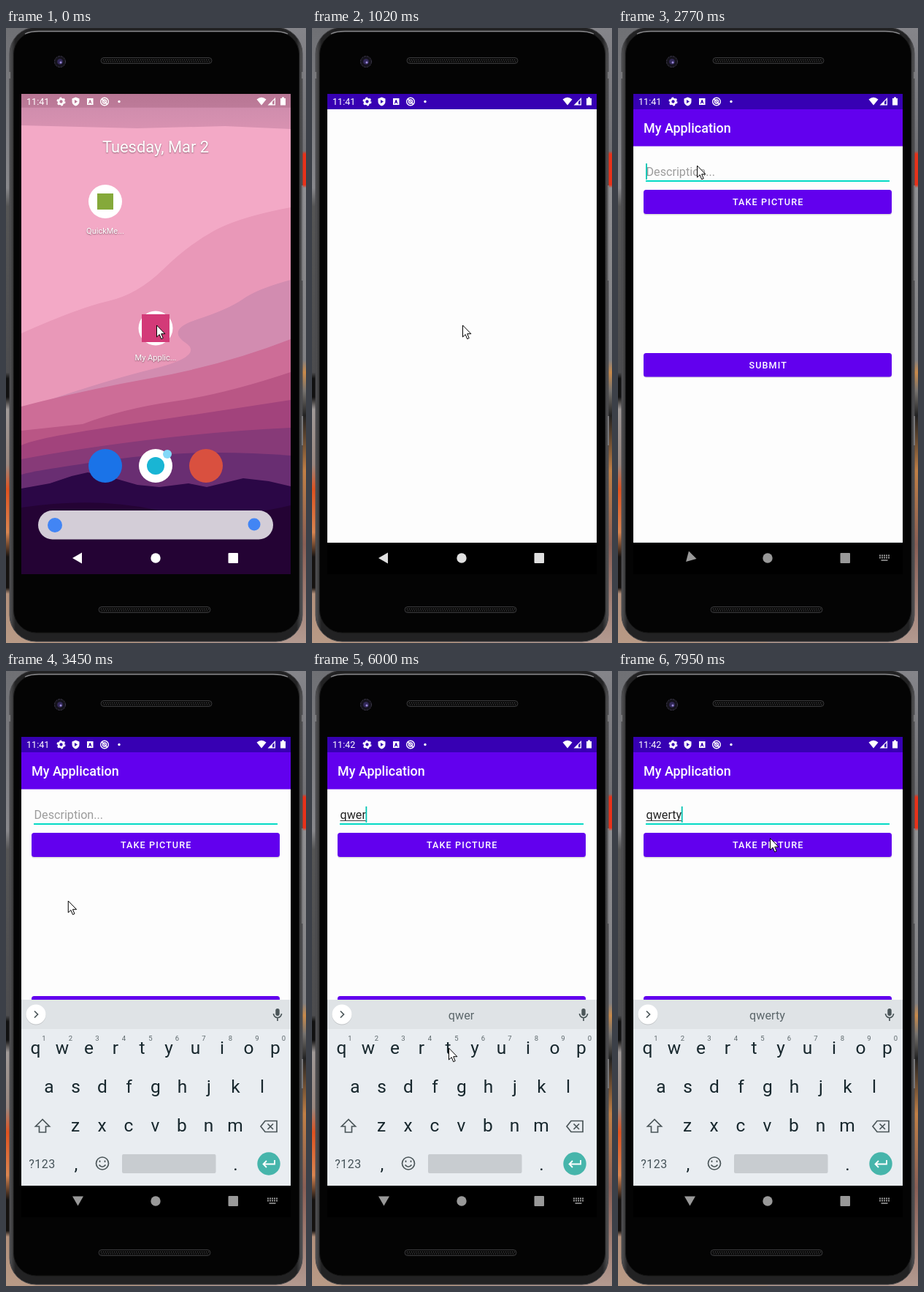
These frames come from a looping animation (411x840 px, 8 s). An HTML page:

```html
<!DOCTYPE html>
<html lang="en">
<head>
<meta charset="utf-8">
<title>Phone demo</title>
<style>
html, body { margin: 0; height: 100%; overflow: hidden; background: #000 }
svg { display: block; width: 100vw; height: 100vh }
text { font-family: Roboto, "Noto Sans", sans-serif; white-space: pre }
.mid { text-anchor: middle }
.label { font-size: 11px; fill: #fff; text-shadow: 0 1px 2px #0007 }
.btn { font-size: 12.6px; font-weight: 500; letter-spacing: 1.12px; fill: #fff }
.line { fill: none; stroke: #4b5659; stroke-width: 1.7 }
</style>
</head>
<body>
<svg viewBox="0 0 411 840">
<defs>
  <linearGradient id="left" x2="0" y2="1">
    <stop offset="0" stop-color="#6f7074"/><stop offset=".26" stop-color="#88888c"/>
    <stop offset=".29" stop-color="#555"/><stop offset=".56" stop-color="#4c4c4e"/>
    <stop offset=".57" stop-color="#111"/><stop offset=".6" stop-color="#111"/>
    <stop offset=".62" stop-color="#a09a98"/><stop offset=".71" stop-color="#9a8880"/>
    <stop offset=".75" stop-color="#e0521f"/><stop offset=".82" stop-color="#d98550"/>
    <stop offset=".86" stop-color="#151210"/><stop offset=".91" stop-color="#151210"/>
    <stop offset=".92" stop-color="#b3917c"/><stop offset="1" stop-color="#b89a86"/>
  </linearGradient>
  <linearGradient id="right" x2="0" y2="1">
    <stop offset="0" stop-color="#85858a"/><stop offset=".2" stop-color="#707074"/>
    <stop offset=".205" stop-color="#e8321a"/><stop offset=".255" stop-color="#e8321a"/>
    <stop offset=".26" stop-color="#8f8f92"/><stop offset=".54" stop-color="#808083"/>
    <stop offset=".56" stop-color="#c98a4a"/><stop offset=".59" stop-color="#77736f"/>
    <stop offset=".63" stop-color="#222"/><stop offset=".72" stop-color="#c07f45"/>
    <stop offset=".84" stop-color="#8a5f55"/><stop offset="1" stop-color="#b39a90"/>
  </linearGradient>
  <linearGradient id="edge" x2="1" y2="0">
    <stop offset="0" stop-color="#555557"/><stop offset=".02" stop-color="#222223"/>
    <stop offset=".98" stop-color="#222223"/><stop offset="1" stop-color="#555557"/>
  </linearGradient>
  <linearGradient id="shade" x2="0" y2="1">
    <stop offset="0" stop-color="#b87694"/><stop offset=".38" stop-color="#bd7b99"/>
    <stop offset=".4" stop-color="#d08dad"/><stop offset="1" stop-color="#d892b1"/>
  </linearGradient>
  <clipPath id="screen"><path d="M21 90h369v656h-369z"/></clipPath>
  <clipPath id="body"><path d="M21 111h369v592h-369z"/></clipPath>
  <clipPath id="button"><rect x="35" y="221" width="340" height="33" rx="3.5"/></clipPath>
</defs>

<!-- surroundings and phone -->
<path d="M0 0h205v840h-205z" fill="url(#left)"/>
<path d="M205 0h206v840h-206z" fill="url(#right)"/>
<rect x="5" y="-1" width="401" height="839" rx="36" fill="url(#edge)" stroke="#47474a"/>
<rect x="10.500" y="5" width="391" height="821" rx="31" fill="#040404" stroke="#151515"/>
<path d="M26 8Q33 4.500 45 4.500H366Q378 4.500 386 8" fill="none" stroke="#8b8b8e" stroke-width="1.300"/>
<path d="M5 60v9M406 60v9M406 215v130M406 530v40" stroke="#77777a" stroke-width="2"/>
<g fill="#0d0d0d" stroke="#38383a">
  <rect x="130" y="40.500" width="152" height="8" rx="4"/>
  <rect x="127" y="790.500" width="153" height="8" rx="4"/>
</g>
<path d="M133 43.500h147M134 46h145M130 793.500h148M131 796h146" stroke="#4a4a4c" stroke-dasharray="1 2"/>
<circle cx="74" cy="46" r="7.500" fill="#15131c" stroke="#3c3848" stroke-dasharray="3 1"/>
<circle cx="74" cy="46" r="3.800" fill="#33295a"/>
<circle cx="75" cy="47" r="1.500" fill="#9b8cd8"/>

<g clip-path="url(#screen)">
  <g id="home">
    <path d="M21 90h369v656h-369z" fill="#f3a9c6"/>
    <path d="M21 90H390V138L300 134 180 137 21 133z" fill="url(#shade)"/>
    <path d="M390 245Q320 258 285 277T215 330 140 373 21 417V746H390z" fill="#e998b8"/>
    <path d="M390 344Q345 356 325 370T262 398 246 430 200 466 21 521V746H390z" fill="#d28cb0"/>
    <path d="M390 425Q300 460 200 478T21 517V746H390z" fill="#cd6d97"/>
    <path d="M390 470Q300 500 230 510T105 541L21 550V746H390z" fill="#b95685"/>
    <path d="M390 508Q260 528 150 544T21 570V746H390z" fill="#a2437c"/>
    <path d="M390 546Q300 550 200 562T21 589V746H390z" fill="#873a78"/>
    <path d="M390 584Q260 574 150 589T21 610V746H390z" fill="#692e72"/>
    <path d="M21 629L60 622 90 612 112 607 145 614 180 624 210 627 250 622 275 627 325 615 360 619 390 626V746H21z" fill="#2b0746"/>
    <path d="M21 655Q120 640 205 658T390 652V746H21z" fill="#240334"/>
    <text class="mid" x="205" y="170" font-size="21.900" fill="#fff" style="text-shadow:0 1px 2px #0006">Tuesday, Mar 2</text>
    <circle cx="136" cy="237" r="23" fill="#fff"/>
    <path d="M125 226h22v22h-22z" fill="#85a93a"/>
    <text class="label mid" x="136" y="281">QuickMe...</text>
    <circle cx="205" cy="410" r="23.500" fill="#fff"/>
    <path d="M186 391h38v38h-38z" fill="#d33a78"/>
    <text class="label mid" x="205" y="454">My Applic...</text>
    <circle cx="136" cy="598" r="23" fill="#1a73e8"/>
    <circle cx="205" cy="598" r="23" fill="#fff"/>
    <circle cx="205" cy="598" r="12" fill="#19b5d4"/>
    <circle cx="221" cy="582" r="6" fill="#83d8f7"/>
    <circle cx="274" cy="598" r="23" fill="#d9503f"/>
    <rect x="44" y="659" width="322" height="39.500" rx="19.700" fill="#d3cdd7"/>
    <circle cx="67" cy="679" r="10" fill="#4285f4"/>
    <circle cx="340" cy="678" r="8.500" fill="#4285f4"/>
  </g>
  <rect id="launch" fill="#fdfdfd"/>

  <g id="app">
    <path d="M21 90h369v656h-369z"/>
    <path d="M21 90h369v21h-369z" fill="#3700b3"/>
    <path d="M21 111h369v592h-369z" fill="#fdfdfd"/>
    <g id="content" clip-path="url(#body)">
      <path d="M21 111h369v50.500h-369z" fill="#6200ee"/>
      <text x="35" y="143" font-size="17.960" font-weight="500" fill="#fff">My Application</text>
      <text id="field" x="38.500" y="202" font-size="16.160"/>
      <path id="under" stroke="#444"/>
      <path d="M38 209h334" stroke="#03dac5" stroke-width="1.800"/>
      <path id="caret" stroke="#03c4b2" stroke-width="1.800"/>
      <rect x="35" y="222.500" width="340" height="33" rx="3.500" fill="#0002"/>
      <rect x="35" y="445.500" width="340" height="32" rx="3.500" fill="#0002"/>
      <rect id="lift" x="35" y="226" width="340" height="33" rx="4" fill="#0003"/>
      <rect x="35" y="221" width="340" height="33" rx="3.500" fill="#6200ee"/>
      <circle id="ripple" cx="209" cy="236" fill="#fff" clip-path="url(#button)"/>
      <rect x="35" y="444" width="340" height="32.500" rx="3.500" fill="#6200ee"/>
      <text class="btn mid" x="205.700" y="242.300">TAKE PICTURE</text>
      <text class="btn mid" x="205.700" y="465">SUBMIT</text>
      <g id="board">
        <path d="M21 449h369v254h-369z" fill="#e9edf1"/>
        <path d="M21 449h369v40h-369z" fill="#dfe3e6"/>
        <circle cx="41" cy="470" r="13.500" fill="#0002"/>
        <circle cx="41" cy="469" r="13.500" fill="#fff"/>
        <path class="line" d="M39 464.500l4.500 4.500-4.500 4.500"/>
        <rect x="369.300" y="461" width="5.400" height="10" rx="2.700" fill="#4b5659"/>
        <path class="line" d="M366.500 468a5.500 5.500 0 0 0 11 0M372 474v4" stroke-width="1.400"/>
        <path id="bars" d="M150.500 458v22M258.500 458v22" stroke="#c3c8cb"/>
        <g id="words" class="mid" font-size="16.200" fill="#5c676b"></g>
        <g id="keys" class="mid" font-size="24.500" fill="#17272d"></g>
        <path class="line" d="M50 612.500l-9.500 9.500h5v8h9v-8h5z"/>
        <path class="line" d="M355 614.500h16v15h-16l-6-7.500zM358.500 618.500l7.500 7.500M366 618.500l-7.500 7.500"/>
        <circle class="line" cx="132" cy="672.500" r="8.500"/>
        <path class="line" d="M127.500 674.500q4.500 5.500 9 0M128.500 668.500v2.500M135.500 668.500v2.500"/>
        <rect x="159" y="660" width="128.500" height="26" rx="2" fill="#c8ccd0"/>
        <text class="mid" x="49.500" y="678.500" font-size="16" letter-spacing=".5" fill="#455258">?123</text>
        <circle cx="360" cy="673" r="15.700" fill="#46b5ab"/>
        <path d="M368 668v5.500h-15M357 669l-4.500 4.500 4.500 4.500" fill="none" stroke="#fff" stroke-width="1.800"/>
      </g>
    </g>
  </g>

  <!-- status bar -->
  <g fill="#fff">
    <text id="clock" x="28" y="105" font-size="12.600"/>
    <circle cx="75.500" cy="100.500" r="3.500" fill="none" stroke="#fff" stroke-width="2.700"/>
    <circle cx="75.500" cy="100.500" r="5.200" fill="none" stroke="#fff" stroke-width="1.700" stroke-dasharray="2.700 2.750"/>
    <path fill-rule="evenodd" d="M95.500 94.500l5 2v4q0 4-5 6-5-2-5-6v-4zM94 98v5l4-2.500z"/>
    <path fill-rule="evenodd" d="M111 96h8.500v9h-8.500zM112.700 103.500h1l.5-1.300h2l.5 1.300h1l-2-5.500h-1z"/>
    <g fill="none" stroke="#fff" stroke-width="1.400">
      <circle cx="135" cy="100.500" r="5.300"/><circle cx="135" cy="100.500" r="2.500"/><path d="M131 96.500l8 8"/>
    </g>
    <circle cx="155" cy="100.500" r="1.700"/>
    <path d="M343.500 97.500q6.500-5.500 13 0l-6.500 8z"/>
    <path fill-rule="evenodd" d="M369 95v10.500h-10.500zM367.700 98v6.200h-2.700v-3.500z"/>
    <path d="M376 96h2v-1.500h3v1.500h2v9.500h-7z"/>
  </g>

  <!-- navigation bar -->
  <g id="nav">
    <path id="back" d="M-8 0L5-7.500V7.500z"/>
    <circle cx="205" cy="724" r="6.700"/>
    <rect x="304.500" y="717" width="13.500" height="14" rx="1"/>
    <g id="switcher">
      <path d="M358 720.500h14M358 723.500h14" stroke="#999" stroke-width="1.800" stroke-dasharray="2 1"/>
      <path d="M360.500 727h9" stroke="#999" stroke-width="1.600"/>
    </g>
  </g>
</g>
<path id="cursor" d="M0 0V16L3.700 12.600 6.200 18.700 8.700 17.600 6.200 11.700H11.400z" fill="#fff" stroke="#000"/>
</svg>

<script>
const LOOP = 8000, STEP = 132.5;
const $ = id => document.getElementById(id);
const set = (id, attrs) => { for (const k in attrs) $(id).setAttribute(k, attrs[k]); };
const show = (id, on) => { $(id).style.display = on ? '' : 'none'; };

// Rows are [time, ...values]; values are interpolated between rows.
function track(t, rows) {
  const i = rows.findIndex(r => r[0] > t);
  if (i < 0) return rows.at(-1).slice(1);
  if (!i) return rows[0].slice(1);
  const a = rows[i - 1], b = rows[i], p = (t - a[0]) / (b[0] - a[0]);
  return a.slice(1).map((v, k) => v + (b[k + 1] - v) * p);
}

const label = (s, x, y, extra = '') => `<text x="${x}" y="${y}" ${extra}>${s}</text>`;
const row = (s, x, y) => [...s].map((c, i) => label(c, x + i * 36.5, y)).join('');
$('keys').innerHTML = row('qwertyuiop', 40.5, 523) + row('asdfghjkl', 59, 576) +
  row('zxcvbnm', 95, 629) + label(',', 96, 682) + label('.', 314.5, 682) +
  [...'1234567890'].map((c, i) => label(c, 52 + i * 36.5, 505, 'font-size="9.5" fill="#5c676b"')).join('');

const PATH = [
  [1590, 206.5, 406], [2120, 108.5, 188], [3180, 108.5, 188], [3710, 62, 440], [4108, 40, 517],
  [4505, 40, 517], [4637, 69, 518], [4770, 77, 517], [4902, 77, 517], [5167, 113, 517],
  [5300, 113, 517], [5565, 150, 516], [5697, 150, 516], [5962, 187.5, 515], [6095, 187.5, 515],
  [6360, 224, 517], [6492, 224, 517], [7020, 208.5, 228.5]
];
const TYPED = [4372, 4902, 5300, 5697, 6095, 6492];
const TAPS = [1325, 2500, ...TYPED];

function draw(t) {
  const [x, y] = track(t, PATH);
  set('cursor', { transform: `translate(${x} ${y})` });

  const [open] = track(t, [[0, 0], [390, 1]]);
  const grow = (from, to) => from + (to - from) * open;
  show('home', open < 1);
  show('app', open === 1);
  set('launch', {
    x: grow(181, 21), y: grow(387, 90), width: grow(47, 369), height: grow(47, 656),
    rx: grow(23, 0), opacity: Math.min(1, open * 1.8)
  });
  set('content', { opacity: track(t, [[927, 0], [1325, 1]])[0] });
  $('clock').textContent = t < 5400 ? '11:41' : '11:42';

  const word = 'qwerty'.slice(0, TYPED.filter(k => k <= t).length);
  const field = $('field');
  field.textContent = word || 'Description...';
  set('field', { fill: word ? '#222' : '#9c9c9c' });
  const end = 39 + (word ? field.getComputedTextLength() : 0);
  set('under', { d: word ? `M38.5 204.5H${end - .5}` : '' });
  set('caret', { d: `M${end} 185V207` });
  const tap = TAPS.findLast(k => k <= t) || 0;
  show('caret', (t - tap) % 1000 < 500);

  const three = word === 'q';
  show('bars', three);
  $('words').innerHTML = three
    ? label('q', 102, 475.5) + label('a', 204, 475.5) + label('l', 306, 475.5)
    : label(word, 204.5, 475.5);
  const [slide] = track(t, [[2782, 254], [2915, 150], [3047, 45], [3180, 0]]);
  set('board', { transform: `translate(0 ${slide})` });

  const press = t > 7250 && t < 7500;
  show('lift', press);
  show('ripple', press);
  set('ripple', { r: track(t, [[7200, 40], [7420, 200]])[0], opacity: track(t, [[7260, .24], [7500, .06]])[0] });

  const grey = Math.round(track(t, [[600, 255], [662, 240], [927, 224], [1325, 153]])[0]);
  set('nav', { fill: `rgb(${grey},${grey},${grey})` });
  const [turn] = track(t, [[2650, 0], [2915, 1]]);
  set('back', { transform: `translate(${99 - turn * .5} ${724 - turn * 1.5}) rotate(${-90 * turn})` });
  show('switcher', t >= 2640);
}

function frame() {
  const t = performance.now() % LOOP;
  draw(Math.floor((t + 30) / STEP) * STEP);
  requestAnimationFrame(frame);
}
frame();
</script>
</body>
</html>
```
